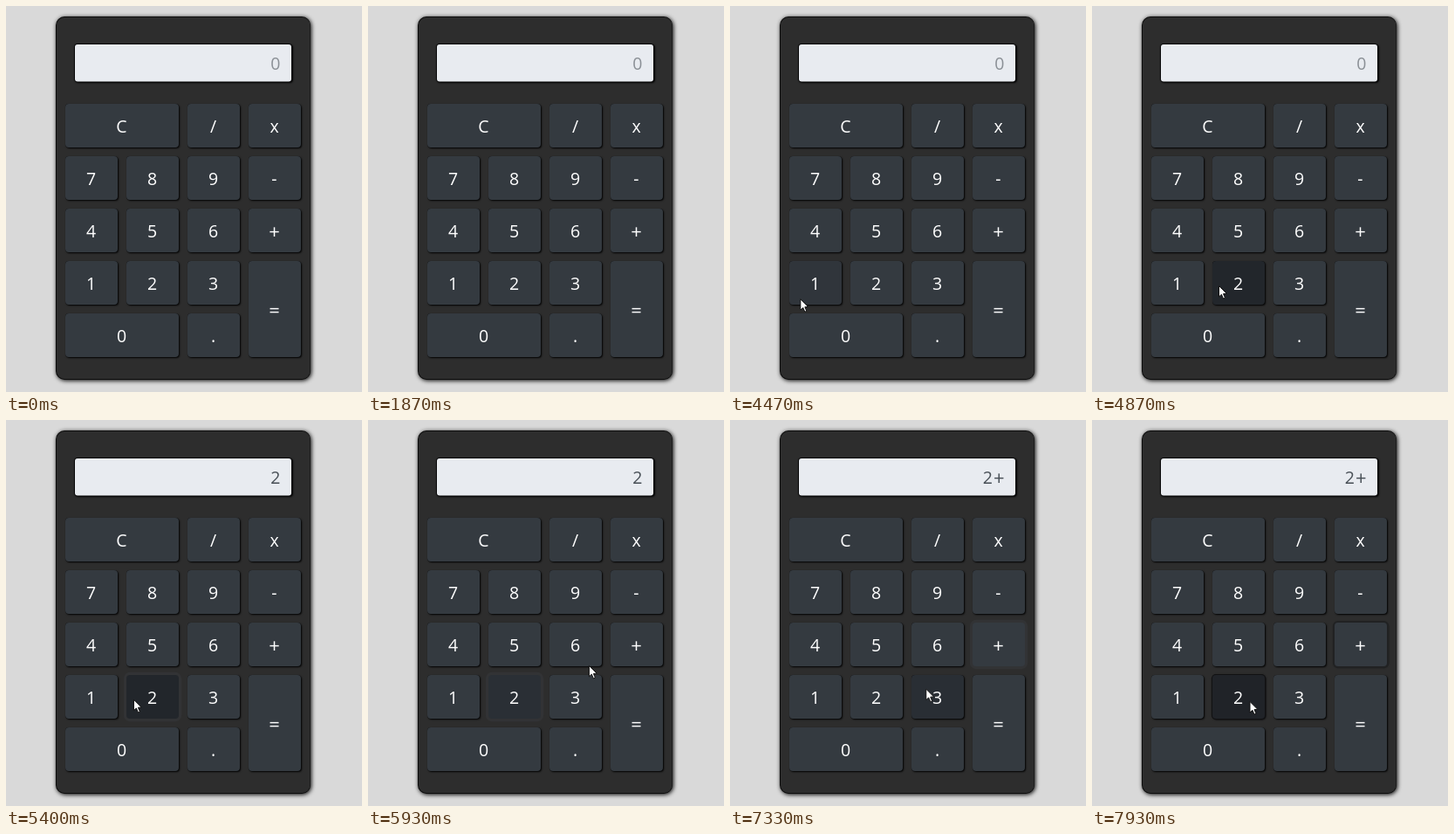
An HTML page with a canvas for the animation above (8 s loop, 408 px wide and 442 px high).

```html
<!DOCTYPE html>
<html lang="en">
<head>
<meta charset="utf-8">
<title>Calculator</title>
<style>
  html, body { margin: 0; width: 100%; height: 100%; overflow: hidden; background: #d9d9d9; }
  canvas { display: block; width: 408px; height: 442px; }
</style>
</head>
<body>
<canvas id="stage" width="408" height="442"></canvas>
<script>
const ctx = document.getElementById('stage').getContext('2d');
const LOOP = 8000, STEP = 200 / 3, FADE = 150;
const FONT = '"Open Sans", "Noto Sans", sans-serif';
const NORMAL = [52, 58, 64], HOVER = [34, 38, 43], ACTIVE = [29, 32, 36];
const SHADOW = [0, 0, 0], RING = [50, 51, 53];

// label, column, row, column span, row span
const KEYS = [
  ['C', 0, 0, 2, 1], ['/', 2, 0, 1, 1], ['x', 3, 0, 1, 1],
  ['7', 0, 1, 1, 1], ['8', 1, 1, 1, 1], ['9', 2, 1, 1, 1], ['-', 3, 1, 1, 1],
  ['4', 0, 2, 1, 1], ['5', 1, 2, 1, 1], ['6', 2, 2, 1, 1], ['+', 3, 2, 1, 1],
  ['1', 0, 3, 1, 1], ['2', 1, 3, 1, 1], ['3', 2, 3, 1, 1], ['=', 3, 3, 1, 2],
  ['0', 0, 4, 2, 1], ['.', 2, 4, 1, 1]
];

// Time spans in ms per key
const hovered = { 1: [[4420, 4640]], 2: [[4670, 5862], [7400, 9000]], '+': [[5990, 7140]], 3: [[7250, 7400]] };
const pressed = { 2: [[5110, 5250], [7860, 9000]], '+': [[6780, 6910]] };
const focused = { 2: [[5110, 6780], [7875, 9000]], '+': [[6780, 7875]] };

// Pointer path: time, x, y
const PATH = [
  [4066, 10, 352], [4400, 62, 340], [4600, 118, 327], [4733, 143, 322], [4867, 145.5, 320.5],
  [5733, 147, 320], [5800, 165, 315], [5867, 205, 301], [5933, 253, 281.5],
  [6000, 285, 269], [6133, 303, 263], [6533, 305, 263], [7000, 304, 264],
  [7133, 285, 276], [7267, 247, 297], [7333, 225, 308], [7400, 204, 316],
  [7533, 185, 322], [7733, 181, 322.5]
];

const mix = (a, b, f) => a.map((v, i) => v + (b[i] - v) * f);
const rgb = c => `rgb(${c.map(Math.round)})`;

function ease(p) {
  p = Math.max(0, Math.min(1, p));
  return p * p * (3 - 2 * p);
}

function level(spans, t) {
  return (spans || []).reduce((sum, [on, off]) => sum + ease((t - on) / FADE) - ease((t - off) / FADE), 0);
}

function box(x, y, w, h, r, fill) {
  ctx.beginPath();
  ctx.roundRect(x, y, w, h, r);
  ctx.fillStyle = fill;
  ctx.fill();
}

function shadow(color, offset, blur) {
  ctx.shadowColor = color;
  ctx.shadowOffsetX = ctx.shadowOffsetY = offset;
  ctx.shadowBlur = blur;
}

function text(str, x, y, size, color, align) {
  ctx.font = `400 ${size}px ${FONT}`;
  ctx.textAlign = align;
  ctx.fillStyle = color;
  ctx.fillText(str, x, y);
}

function drawCase(t) {
  ctx.fillStyle = '#d9d9d9';
  ctx.fillRect(0, 0, 408, 442);
  ctx.save();
  shadow('#000', 1, 5);
  box(57, 12, 292, 416, 10, '#0c0c0c');
  ctx.restore();
  box(58, 13, 290.5, 414, 9, '#2d2d2d');

  ctx.save();
  shadow('#000', 1, 2);
  box(78, 43, 250, 44, 4, '#0a0a0a');
  ctx.restore();
  box(79, 44, 248, 42.5, 3, '#e8ebf0');
  if (t < 5270) text('0', 314.5, 73, 19.5, '#8b9096', 'right');
  else if (t < 6910) text('2', 314.5, 73, 19.5, '#495057', 'right');
  else {
    text('2', 301, 73, 19.5, '#495057', 'right');
    text('+', 314.5, 74, 22, '#495057', 'right');
  }
}

function drawKey([label, col, row, cols, rows], t) {
  const x = 68 + col * 70, y = 112 + row * 60;
  const w = cols * 70 - 10, h = rows * 60 - 10;
  const focus = level(focused[label], t);
  const fill = mix(mix(NORMAL, HOVER, level(hovered[label], t)), ACTIVE, level(pressed[label], t));

  ctx.save();
  const edge = rgb(mix(SHADOW, RING, focus)), spread = 3.2 * focus;
  shadow(edge, 1 - focus, 2 * (1 - focus));
  box(x - spread, y - spread, w + 2 * spread, h + 2 * spread, 4 + spread, edge);
  ctx.restore();
  box(x, y, w, h, 4, rgb(fill));

  const sign = label === '+' || label === '=';
  text(label, x + w / 2 - 0.5, y + h / 2 + (sign ? 8.5 : 8), sign ? 22 : 19.5, '#fff', 'center');
}

function drawPointer(t) {
  if (t < PATH[0][0]) return;
  let i = PATH.findIndex(p => p[0] > t);
  if (i < 0) i = PATH.length;
  const a = PATH[i - 1], b = PATH[i] || a;
  const f = b === a ? 0 : (t - a[0]) / (b[0] - a[0]);
  const [, x, y] = mix(a, b, f);
  ctx.save();
  ctx.translate(x, y);
  ctx.beginPath();
  [[0, 0], [0, 12.5], [2.9, 9.8], [5, 14.6], [7, 13.7], [5, 9.1], [8.8, 8.8]]
    .forEach(([px, py]) => ctx.lineTo(px, py));
  ctx.closePath();
  ctx.fillStyle = '#fff';
  ctx.strokeStyle = '#111';
  ctx.lineWidth = 1;
  ctx.fill();
  ctx.stroke();
  ctx.restore();
}

function draw(now) {
  const t = Math.floor((now % LOOP + 4) / STEP) * STEP + 0.5;
  drawCase(t);
  KEYS.forEach(key => drawKey(key, t));
  drawPointer(t);
}

const start = performance.now();
function tick() {
  draw(performance.now() - start);
  requestAnimationFrame(tick);
}
tick();
</script>
</body>
</html>
```
